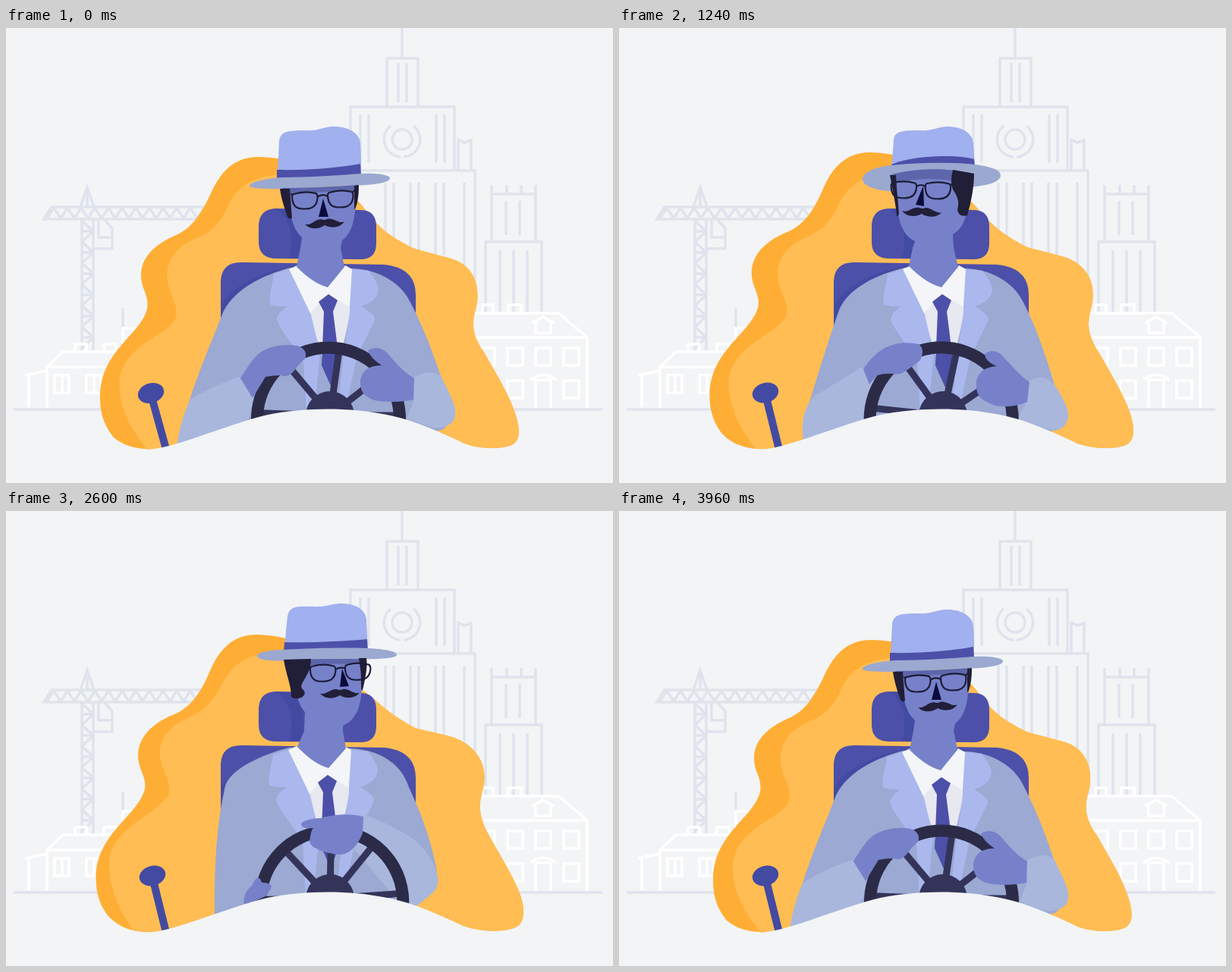
Write an HTML page that moves like this. It is 800x600 px and loops after 4000 ms.

```html
<!DOCTYPE html>
<html>
<head>
<meta charset="utf-8">
<style>
html, body { margin: 0; width: 100%; height: 100%; overflow: hidden; background: #f2f4f6; }
svg { display: block; width: 100vw; height: 100vh; }
.line { fill: none; stroke: #dfe3ec; stroke-width: 3.5; }
.white { stroke: #fff; }
</style>
</head>
<body>
<svg id="stage" viewBox="0 0 800 600">
  <g class="line">
    <path d="M522 0V40M502 104V40H543V104M517 46V98M528 46V98M454 188V104H591V188M467 114V178M478 114V178M567 114V178M578 114V178M454 503V188H618V375M596 188V147L604 151L613 148V188"/>
    <path d="M500 204V300M511 204V300M533 204V300M544 204V300M566 204V300M577 204V300M604 204V375"/>
    <circle cx="522" cy="147" r="13"/>
    <path d="M507 129A23 23 0 0 0 520 170M537 129A23 23 0 0 1 524 170"/>
    <path d="M640 282V207M698 282V207M640 219H698M660 207V219M679 207V219M659 228V273M677 228V273M632 375V282H706V375M651 293V375M669 293V375M687 293V375"/>
    <path id="crane"/>
    <path d="M154 370V396M10 503H786"/>
  </g>
  <g class="line white">
    <path d="M154 420V396H190M30 500V458M25 458L54 452M54 501V447L75 427H160M54 447H160M91 426V417H106V426M129 426V417H145V426M64 458H83V481H64ZM74 458V481M106 458H125V481H106ZM116 458V481"/>
    <path d="M600 376H728L766 408V501M766 408H610M628 376V365H642V376M662 376V365H679V376M698 388V402H718V388M693 389L708 381L722 389M698 501V464H718V501M691 464Q708 451 725 464"/>
    <path id="windows"/>
  </g>
  <g id="scene"></g>
</svg>
<script>
const el = id => document.getElementById(id);

let crane = "M300 236H60L50 252H300M98 236L107 210L116 236M107 210V236M100 252V425M115 252V425M122 252V276H140M130 253L140 264V291H115";
for (let x = 54; x < 290; x += 18) crane += `M${x} 251L${x + 9} 237L${x + 18} 251`;
for (let y = 254; y < 420; y += 28) crane += `M100 ${y}L115 ${y + 14}L100 ${y + 28}M100 ${y + 14}H115`;
el("crane").setAttribute("d", crane);

let windows = "";
for (const x of [624, 661, 698, 735])
  for (const y of [422, 465])
    if (x !== 698 || y === 422) windows += `M${x} ${y}h20v23h-20z`;
el("windows").setAttribute("d", windows);

// Numbers inside two equally built strings are blended.
const NUM = /-?\d+(\.\d+)?/g;
function mix(a, b, k) {
  const ends = b.match(NUM);
  let i = 0;
  return a.replace(NUM, n => (+n + (ends[i++] - n) * k).toFixed(2));
}

function add(attrs, tag = "path", parent = el("scene")) {
  const node = document.createElementNS("http://www.w3.org/2000/svg", tag);
  for (const key in attrs) node.setAttribute(key, attrs[key]);
  return parent.appendChild(node);
}

const SKIN = "#7681c9", INDIGO = "#4d50a9", DEEP = "#434aa2", JACKET = "#9ba9d3",
  SLEEVE = "#a9b7dd", LAPEL = "#aab8ee", HAIR = "#211e38";
const KEYS = [0, 400, 1240, 1880, 2600, 3080, 3960];
const posed = [];
// A part with one value per pose; the value feeds the given attribute.
function part(attrs, poses, name = "d", tag = "path") {
  const node = add(attrs, tag);
  posed.push({ node, poses, name });
  return node;
}

// Backdrop blob
const edge = {
  outer: ["M335 170C300 169 283 190 270 218C255 250 243 265 222 274C195 286 178 303 178 326C178 345 189 352 186 370C178 405 124 425 124 487C124 510 130 525 142 540C155 551 172 556 195 555",
    "M330 161C297 161 279 183 268 210C255 242 240 260 218 268C190 280 173 298 173 322C173 340 185 350 182 366C172 402 117 425 117 483C117 506 124 522 134 534C150 551 172 557 195 555"],
  inner: ["M380 193C330 192 305 207 293 235C280 262 270 270 250 278C222 290 211 310 213 332C215 352 229 365 224 383C213 408 150 418 150 472C150 505 170 535 187 556L195 555",
    "M380 184C322 183 298 200 284 228C270 255 258 263 240 272C212 284 201 302 202 322C204 342 218 355 214 372C200 400 135 418 135 465C135 500 150 530 167 553L195 555"],
  right: ["C620 556 655 556 668 549C679 542 676 525 672 512C664 485 648 460 630 428C610 400 615 385 620 365C626 330 608 310 585 304C560 297 545 294 535 290C500 272 490 262 470 235",
    "C625 556 660 556 674 548C686 540 683 520 678 505C668 480 655 460 637 428C622 400 624 385 629 368C638 335 620 310 592 299C570 292 550 289 540 286C505 268 492 252 470 236"],
  top: ["C440 200 400 172 335 170Z", "C440 205 400 162 330 161Z"]
};
const HOOD = "C235 549 300 520 345 510C400 499 470 499 530 517C560 527 580 537 600 546";
const blob = add({ fill: "#ffae35" }), blobLight = add({ fill: "#ffbd54" });

// Seat
add({ fill: INDIGO, d: "M357 238L467 240Q488 240 488 262V284Q488 305 467 305L357 304Q333 304 333 282V262Q333 238 357 238Z" });
add({ fill: DEEP, d: "M358 239Q384 262 373 304H392V239Z" });
add({ fill: INDIGO, d: "M283 402V334Q284 309 310 309L498 312Q540 316 540 352V386L420 420Z" });
add({ fill: DEEP, d: "M284 364Q310 326 380 314L400 345L284 402Z" });

part({ fill: JACKET }, [
  "M375 316C340 325 297 345 284 380C265 430 238 485 228 550L420 560L575 530C592 520 580 480 575 465C560 420 550 395 533 362C520 335 490 318 455 317Z",
  "M381 317C345 322 310 340 298 370C282 405 262 465 250 500L420 560L577 540C576 510 570 470 560 430C550 400 542 375 536 362C522 335 490 319 461 317Z",
  "M377 316C340 325 303 342 290 372C275 415 258 470 246 510L420 560L578 530C590 515 580 490 575 474C562 430 550 395 533 362C520 335 490 318 456 317Z",
  "M371 315C335 322 300 342 290 372C278 420 262 480 253 545L420 560L545 520C560 505 580 480 577 462C562 425 548 395 530 362C520 335 490 314 452 313Z",
  "M373 312C335 322 297 340 289 362C282 395 274 440 275 535L420 560L540 520C565 505 570 490 567 470C558 425 545 395 530 362C520 332 490 314 453 313Z",
  "M375 313C340 320 300 340 288 372C268 430 245 480 235 512L420 560L580 520C592 515 585 490 577 470C563 430 548 395 531 362C520 332 490 315 455 313Z"
]);

// Shirt, tie and lapels move as one
const chest = part({}, [
  "translate(0,0)", "translate(5,1)", "translate(1,0)",
  "translate(-2,-2)", "translate(-1,-3)", "translate(0,-2)"
], "transform", "g");
for (const [fill, d] of [
  ["#e7e8f0", "M384 320H446L454 375L443 425L428 470L414 425L400 376Z"],
  [LAPEL, "M373 318L353 324C351 340 346 352 348 365Q360 368 371 367Q357 376 357 385C362 400 385 425 392 440L396 510H406L414 430L402 378Z"],
  [LAPEL, "M455 318L478 320Q490 335 491 345Q490 360 468 367Q487 378 486 385C480 400 467 420 461 440L446 510H436L445 430L453 375Z"],
  ["#f4f5f8", "M373 318L384 313L424 340V351L401 376Z"],
  ["#f4f5f8", "M447 313L456 318L453 368L424 351V340Z"],
  [INDIGO, "M425 351L437 359L431 374L440 445L429 474L416 445L419 374L412 361Z"]
]) add({ fill, d }, "path", chest);

part({ fill: SLEEVE }, [
  "M308 460L330 490L318 518L225 552C228 530 235 505 243 490Q275 470 308 460Z",
  "M365 412L385 428L325 515L258 540C246 530 246 500 265 480Q300 455 365 412Z",
  "M320 447L345 465L322 517L243 545C240 520 243 500 258 485Q275 475 320 447Z",
  "M305 490L320 516L310 520L252 542C253 530 257 525 265 518Q290 505 305 490Z",
  "M318 520L322 522L310 530L270 545C275 540 280 535 285 532Q300 528 318 520Z",
  "M303 477L322 502L300 525L222 552C223 535 228 520 242 508Q270 495 303 477Z"
]);
part({ fill: SLEEVE }, [
  "M536 462Q560 447 574 460C585 485 596 500 591 515C588 525 570 530 558 526L528 515L538 490Z",
  "M533 522Q555 528 575 540C577 541 577 542 577 543C570 545 560 545 558 543L540 535L535 525Z",
  "M538 467Q562 452 577 475C586 490 595 505 591 517C588 528 575 535 560 527L525 515L536 495Z",
  "M517 425Q540 428 563 440C582 462 584 480 577 490C568 505 555 510 545 520L528 512L514 455Z",
  "M470 400Q510 413 540 435C562 455 572 480 569 492C566 505 552 510 543 520L518 516L458 445Z",
  "M529 455Q560 450 575 468C588 482 598 495 595 507C590 520 570 525 557 520L530 515L528 482Z"
]);

// Hat
part({ fill: "#a1b0ee" }, [
  "M357 196C359 180 359 165 360 150C361 136 372 135 395 135C412 136 415 131 430 130C450 129 466 138 467 152C468 165 468 180 468 192Z",
  "M363 186C364 170 365 165 367 150C368 137 380 136 400 136C418 137 422 133 435 132C455 131 470 138 471 152C472 165 473 170 474 186Z",
  "M359 184C360 170 361 165 362 148C363 136 373 135 395 135C413 136 418 131 431 130C450 129 466 138 467 152C468 165 468 170 469 182Z",
  "M359 174C361 160 361 155 362 145C364 133 375 132 395 132C413 132 416 127 430 126C450 125 463 136 464 148C465 155 465 160 466 170Z",
  "M367 186C368 170 369 155 371 140C372 126 383 125 403 126C422 127 425 123 440 122C460 121 474 130 475 143C476 160 476 170 477 184Z",
  "M363 188C364 170 366 155 367 140C368 126 380 125 400 125C419 126 423 122 437 121C457 120 471 128 472 142C473 155 474 170 475 186Z"
]);
part({ fill: INDIGO }, [
  "M357 187C400 188 440 184 467 179L468 195L357 200Z",
  "M363 183C385 173 445 170 473 178L475 190L363 190Z",
  "M359 180C385 168 445 166 468 173L469 184L359 186Z",
  "M361 172C390 166 440 164 465 168L466 172L361 174Z",
  "M367 173C400 174 440 172 476 169L477 186L366 186Z",
  "M364 178C400 178 440 175 473 170L475 188L363 190Z"
]);
part({ fill: "#9ba9d0" }, [
  "M321 208C321 203 345 198 365 197C400 197 440 194 468 192C490 191 506 194 506 198C506 206 470 208 430 209C380 213 321 214 321 208Z",
  "M326 201C326 190 350 186 365 186C400 183 440 183 475 186C495 187 508 192 508 199C508 210 480 216 455 218C400 222 326 220 326 201Z",
  "M321 199C321 188 345 182 360 181C400 177 440 177 470 180C490 183 503 187 503 194C503 205 480 208 462 210C400 220 321 220 321 199Z",
  "M319 195C322 184 345 172 361 169C400 161 440 160 466 165C485 172 500 180 501 187C500 200 480 205 460 207C400 215 330 212 319 195Z",
  "M331 191C331 186 350 183 367 183C400 181 440 180 478 181C500 182 515 185 515 190C515 194 490 196 470 195C400 197 331 202 331 191Z",
  "M330 195C330 190 350 187 364 187C400 187 440 185 474 184C500 183 514 185 514 190C514 196 490 198 470 198C400 203 330 203 330 195Z"
]);

// Face and neck
part({ fill: SKIN }, [
  "M368 211C374 235 374 262 390 276L388 290L383 315Q405 337 424 342L446 315L441 290L443 280C460 268 461 240 462 208Q418 212 368 211Z",
  "M364 197C370 245 368 272 394 283L392 290L386 317Q408 339 428 343L451 317L445 290L444 272C462 262 460 240 471 200Q418 187 364 197Z",
  "M360 193C368 240 366 270 390 281L387 290L382 314Q405 337 425 342L447 315L441 290L440 272C458 262 460 240 467 192Q410 180 360 193Z",
  "M360 188C368 235 366 262 389 277L386 290L381 313Q404 335 423 340L446 312L440 290L441 275C458 265 462 240 466 186Q410 162 360 188Z",
  "M370 196C384 240 384 255 394 265L393 290L384 311Q406 334 425 339L448 313L444 290L444 283C470 272 470 240 470 195Q420 195 370 196Z",
  "M368 201C382 240 384 255 393 264L392 290L383 312Q406 335 425 340L448 313L444 290L444 283C470 272 470 240 469 198Q420 202 368 201Z"
]);
// Shade of the brim on the forehead
part({ fill: "#5d66ab" }, [
  "M364 211Q410 211 463 207L462 214Q410 216 366 220Z",
  "M364 197Q418 187 471 200L470 211Q418 201 366 206Z",
  "M360 193Q410 180 467 192L466 206Q410 193 362 205Z",
  "M362 194Q410 169 466 192L465 198Q410 180 364 204Z",
  "M370 196Q420 195 470 195L470 202Q420 200 372 206Z",
  "M368 201Q420 202 469 198L469 206Q420 208 370 210Z"
]);
// Hair: left side, right side, strip under the brim
part({ fill: HAIR }, [
  "M361 212L374 212C375 225 376 240 377 250Q375 253 372 250C371 249 370 248 370 246C366 235 363 225 361 212Z",
  "M360 198L366 198C368 215 370 230 371 246Q370 249 369 249C368 249 367 248 367 247C367 235 365 215 360 198Z",
  "M357 194L365 194C366 215 368 230 369 245Q368 248 367 248C366 248 366 247 366 246C365 235 361 215 357 194Z",
  "M357 188L368 183C368 205 370 225 371 243Q370 247 369 247C368 247 367 246 367 245C366 235 361 210 357 188Z",
  "M366 196L402 195C402 218 386 226 390 234Q397 240 391 245C385 249 377 247 376 245C376 230 369 215 366 196Z",
  "M364 201L404 200C403 219 388 228 390 237Q400 240 394 246C388 250 377 250 376 248C376 232 367 215 364 201Z"
]);
part({ fill: HAIR }, [
  "M459 208L465 207C465 218 464 230 460 239Q459 240 459 236C459 226 459 222 459 217Q459 212 459 208Z",
  "M441 193L472 199C470 212 472 240 459 251Q448 250 449 238C451 228 446 222 441 213Q436 205 441 193Z",
  "M440 187L468 192C468 210 464 230 459 247Q448 250 446 240C449 228 446 222 440 213Q436 203 440 187Z",
  "M449 178L467 186C467 205 463 225 458 241Q451 244 450 236C452 224 448 215 447 205Q445 195 449 178Z",
  "M465 194L475 194C477 205 473 224 470 236Q468 238 468 230C468 220 468 215 467 208Q466 200 465 194Z",
  "M466 198L472 198C474 205 473 220 471 228Q468 230 468 225C468 218 468 215 468 208Q467 202 466 198Z"
]);
part({ fill: HAIR }, [
  "M361 210Q410 210 465 206L465 206Q410 210 361 210Z",
  "M362 197Q418 187 472 200L472 200Q418 187 362 197Z",
  "M358 193Q410 180 468 192L468 192Q410 180 358 193Z",
  "M357 188Q410 162 467 184L467 194Q410 170 357 196Z",
  "M366 195Q420 194 476 193L476 193Q420 194 366 195Z",
  "M364 200Q420 202 472 197L472 197Q420 202 364 200Z"
]);
part({ fill: "#0b0b3b" }, [
  "M418 225L425 249L412 249Z", "M402 212L403 239L391 236Z", "M401 208L402 235L391 233Z",
  "M404 204L410 226L398 225Z", "M443 208L452 231L440 232Z", "M448 212L460 232L449 235Z"
]);
part({ fill: HAIR, d: "M-26 0C-18 3-13-6-4-5Q0-3 4-5C13-6 18 3 26 0C20 8 8 8 0 3C-8 8-20 8-26 0Z" }, [
  "translate(420,257) rotate(-4)", "translate(400,247) rotate(3)", "translate(399,242) rotate(2)",
  "translate(404,235) rotate(0)", "translate(440,240) rotate(-1)", "translate(447,243) rotate(-1)"
], "transform");

// Glasses: a lens outline reused at two posed spots
const LENS = "M2 2Q17-2 31 2Q34 3 33 10Q31 22 18 22H14Q1 22 0 9Q-1 3 2 2Z";
const wire = { fill: "none", stroke: "#1d1c38", "stroke-width": 2.2 };
part({ ...wire, d: LENS }, [
  "translate(377,217) rotate(-2)", "translate(358,206) rotate(2)", "translate(359,202) rotate(1)",
  "translate(367,195) rotate(0)", "translate(401,203) rotate(-1)", "translate(406,207) rotate(-3)"
], "transform");
part({ ...wire, d: LENS }, [
  "translate(424,215) rotate(-2)", "translate(405,207) rotate(2)", "translate(404,203) rotate(1)",
  "translate(412,195) rotate(0)", "translate(447,201) rotate(-1)", "translate(453,203) rotate(-3)"
], "transform");
part(wire, [
  "M410 223Q417 218 424 222M375 219L378 220M456 217L461 213", "M391 215Q398 210 405 214M358 210L360 209M438 211L443 209",
  "M392 209Q398 205 404 209M359 206L361 205M437 207L442 204", "M400 202Q406 198 412 202M366 198L368 199M445 198L449 195",
  "M434 209Q441 205 448 208M397 206L402 206M478 204L480 204", "M439 213Q446 208 453 210M402 211L407 211M484 205L486 206"
]);

// Steering wheel: the rim sits slightly off the hub
const wheel = part({}, [0, 40, 4, -21, -51, -8].map(a => `translate(427,511) rotate(${a})`), "transform", "g");
for (const angle of [-47, 0, 38, 82, 130, 178, 214])
  add({ stroke: "#34345a", "stroke-width": 9, d: "M20 0H92", transform: `rotate(${-angle})` }, "path", wheel);
add({ r: 32, fill: "#34345a" }, "circle", wheel);
add({ cx: -2, cy: 4.5, r: 94, fill: "none", stroke: "#2b2b47", "stroke-width": 16 }, "circle", wheel);

// Hands
part({ fill: SKIN }, [
  "M309 462C318 448 325 435 335 428C350 418 372 416 387 420Q398 426 394 436Q385 444 378 454Q370 462 362 458Q352 458 342 460L325 488Z",
  "M365 414C375 405 385 398 395 395C412 392 432 396 442 407Q452 420 448 431Q440 435 434 432Q425 435 415 430Q400 425 395 426L380 428Z",
  "M322 450C330 437 340 428 350 422C365 414 385 414 395 417Q404 424 397 438Q388 446 378 452Q370 458 360 456Q350 455 340 458L330 470Z",
  "M309 490C312 475 315 460 325 452C340 445 352 440 362 438Q372 448 368 457Q368 467 360 474Q358 486 350 487Q343 488 338 492L318 516Z",
  "M313 517C314 505 317 500 324 494C330 480 335 482 337 490Q348 490 350 495Q349 500 346 502Q344 508 342 508Q338 510 333 512L318 520Z",
  "M302 478C310 465 315 455 328 443C345 432 362 424 378 426Q384 434 378 440Q384 450 370 462Q362 472 352 472Q345 474 338 474L315 504Z"
]);
part({ fill: SKIN }, [
  "M477 425Q490 418 502 428C512 440 525 455 538 462L537 490C520 494 495 494 483 490C470 484 467 478 467 465Q470 445 495 445Q480 435 477 425Z",
  "M518 478Q523 472 528 478C532 485 533 500 533 518L528 520C515 515 500 515 490 510C487 505 488 495 493 488Q503 484 510 488Q518 492 521 500Z",
  "M482 430Q492 422 503 430C515 442 528 458 541 467L538 493C522 500 500 502 487 494C473 488 470 480 471 466Q475 447 498 446Q483 440 482 430Z",
  "M441 412Q452 405 462 410C480 418 500 424 517 430L515 455C500 465 485 472 478 471C460 462 445 448 442 440Q443 425 460 425Q444 420 441 412Z",
  "M389 412Q395 406 415 405C440 398 460 400 471 403L470 425C462 445 450 453 440 453C425 452 402 446 400 436Q402 420 405 418Q388 420 389 412Z",
  "M462 418Q475 412 485 417C500 428 515 440 530 450L530 475C515 484 495 486 487 482C470 470 457 455 457 442Q462 432 485 432Q466 428 462 418Z"
]);

// Gear stick
const stick = part({}, [-1.6, 1, 0, 0, 0, 0, 0].map(a => `rotate(${a} 209 552)`), "transform", "g");
add({ stroke: DEEP, "stroke-width": 10, d: "M194 487L211 556" }, "path", stick);
add({ fill: DEEP, cx: 193, cy: 481, rx: 17.5, ry: 13, transform: "rotate(-16 193 481)" }, "ellipse", stick);

// Hood hides everything below its curve
add({ fill: "#f2f4f6", d: `M195 555${HOOD}L630 600H195Z` });

const wave = (t, peak, half) => Math.abs(t - peak) > half ? 0 : (1 + Math.cos(Math.PI * (t - peak) / half)) / 2;

function draw(time) {
  const t = time % 4000;
  const lead = wave(t % 2000, 740, 840), lag = wave(t % 2000, 880, 900);
  const right = HOOD + mix(...edge.right, lead);
  blob.setAttribute("d", mix(...edge.outer, lag) + right + mix(...edge.top, lag));
  blobLight.setAttribute("d", mix(...edge.inner, lead) + right + "Z");

  let i = KEYS.length - 1;
  while (KEYS[i] > t) i--;
  const span = (KEYS[i + 1] ?? 4000) - KEYS[i];
  const k = (1 - Math.cos(Math.PI * (t - KEYS[i]) / span)) / 2;
  for (const { node, poses, name } of posed) {
    const from = poses[i] ?? poses[0], to = poses[i + 1] ?? poses[0];
    node.setAttribute(name, mix(from, to, k));
  }
}

function loop() {
  draw(performance.now());
  requestAnimationFrame(loop);
}
loop();
</script>
</body>
</html>
```
